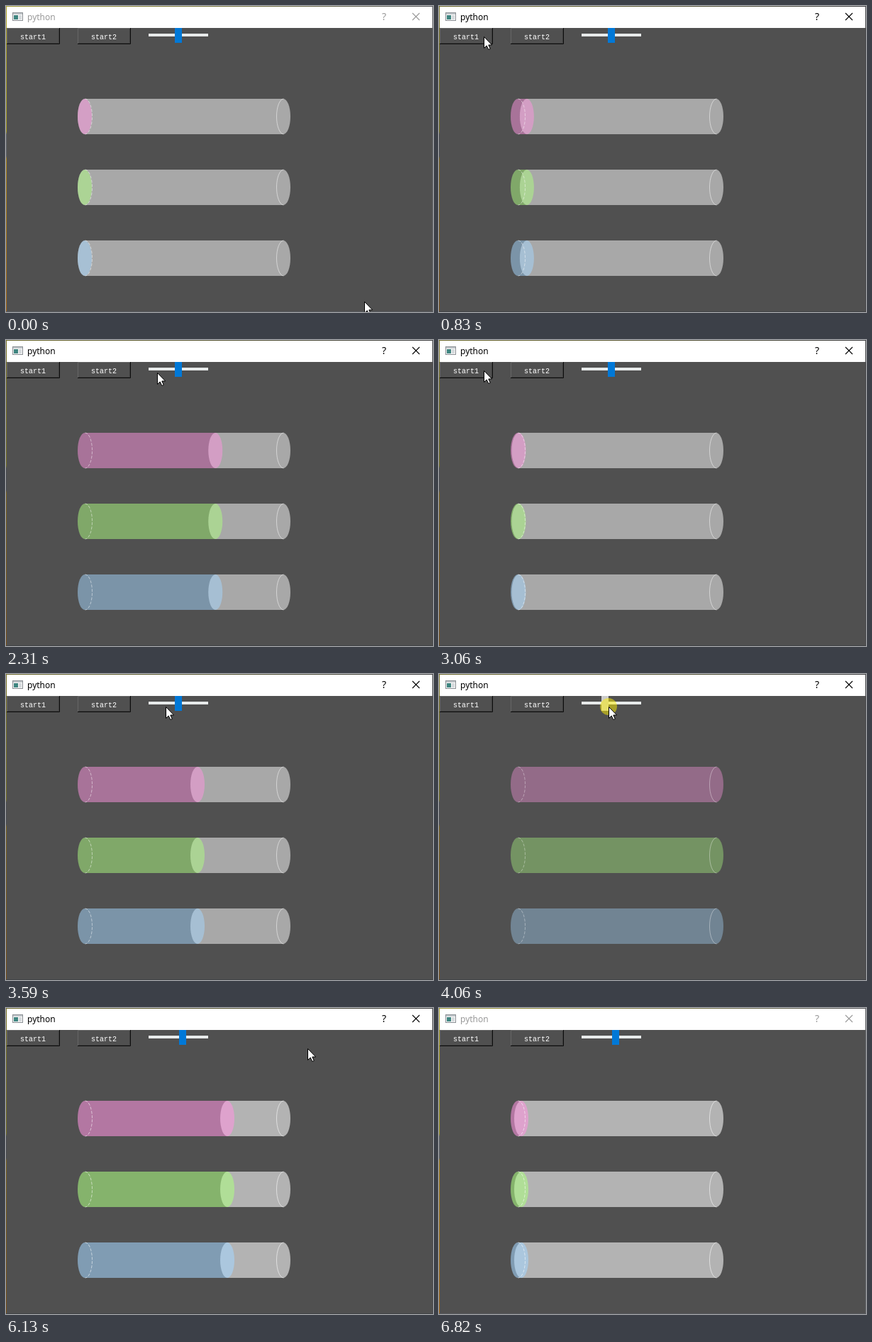
Recreate the animation shown at these times as an HTML page. Size 602 by 432 pixels, loop 6.9 s.

```html
<!DOCTYPE html>
<html lang="en">
<head>
<meta charset="utf-8">
<title>python</title>
<style>
  html, body { margin: 0; width: 100%; height: 100%; overflow: hidden; background: #505050; }
  svg { display: block; width: 602px; height: 432px; }
  .ui { font: 12px "Noto Sans", "Open Sans", sans-serif; fill: #000; }
  .label { font: 10px "Liberation Mono", monospace; fill: #fff; }
  .line { fill: none; stroke: #fff; stroke-width: 1; }
  .glyph { fill: none; stroke: #000; stroke-width: 1.1; }
  .inactive .ui { fill: #999; }
  .inactive .glyph { stroke: #999; }
  .frame { opacity: .62; }
  .inactive .frame { opacity: 1; }
  .light { fill: none; stroke: #666; }
  .dark { fill: none; stroke: #0c0c0c; }
  .shade { fill: none; stroke: #3e3e3e; }
  .pressed .light { stroke: #0c0c0c; }
  .pressed .dark { stroke: #666; }
  .pressed .label { transform: translate(1px, 1px); }
</style>
</head>
<body>
<svg id="stage" viewBox="0 0 602 432">
  <defs>
    <linearGradient id="edge" x1="0" y1="0" x2="0" y2="1">
      <stop offset="0" stop-color="#b0a52c"/>
      <stop offset=".41" stop-color="#a8a028"/>
      <stop offset=".42" stop-color="#62666e"/>
      <stop offset=".49" stop-color="#62666e"/>
      <stop offset=".5" stop-color="#b08a20"/>
      <stop offset="1" stop-color="#a86a18"/>
    </linearGradient>
    <linearGradient id="top">
      <stop offset="0" stop-color="#a09a38"/>
      <stop offset=".5" stop-color="#77743c"/>
      <stop offset="1" stop-color="#55565a"/>
    </linearGradient>
  </defs>

  <rect width="602" height="432" fill="#222"/>
  <g class="frame">
    <rect width="602" height="1" fill="url(#top)"/>
    <rect width="1" height="432" fill="url(#edge)"/>
    <rect x="601" width="1" height="432" fill="#606266"/>
    <rect y="431" width="602" height="1" fill="#55585c"/>
  </g>
  <rect x="1" y="1" width="600" height="30" fill="#fff"/>
  <rect x="1" y="31" width="600" height="400" fill="#505050"/>

  <rect x="9.5" y="9.5" width="14" height="11" fill="#f6f6f6" stroke="#8a8f94"/>
  <rect x="10" y="10" width="13" height="2" fill="#c3c8cc"/>
  <rect x="11" y="13" width="6" height="6" fill="#3f8580"/>
  <rect x="18" y="13" width="4" height="6" fill="#d6dadd"/>
  <text class="ui" x="30" y="20">python</text>
  <text class="ui" x="533" y="20" text-anchor="middle" style="font-size:14px">?</text>
  <path class="glyph" d="M573 10l10 10M583 10l-10 10"/>

  <g id="buttons"></g>
  <rect x="201" y="39" width="84" height="4" fill="#e7eaea"/>
  <rect id="handle" y="31" width="10" height="21"/>
  <g id="tubes"></g>
  <circle id="halo" r="12" fill="#fff000" fill-opacity=".5"/>
  <path id="cursor" d="M.5 .5V16.5L4.2 13L6.8 18.5L9.3 17.4L6.8 12H11.6Z"
        fill="#fff" stroke="#000" stroke-width="1"/>
</svg>
<script>
const LOOP = 6900, STEP = 76.6, LAST = 89;
const LEFT = 111, RIGHT = 391, RX = 10, RY = 25;
const COLORS = ['#ff96e2', '#afff82', '#a5d7ff'];

// Each key: [step, value, ...]
const FRONT = [
  [0, LEFT], [10.4, LEFT], [23.45, RIGHT], [25.53, RIGHT], [38.6, LEFT],
  [39.93, LEFT], [40, 112.5], [49, 315], [52.4, RIGHT],
  [76.37, RIGHT], [80, 312], [89, 116]
];
const VALUE = [[0, 50], [50, 50], [53, 38], [62, 38], [66, 57]];
const POINTER = [
  [0, 505, 417], [3, 420, 290], [6, 180, 100], [8, 70, 45], [9, 63, 43],
  [11, 63, 43], [17, 157, 43], [26, 157, 43], [30, 213, 46], [32, 213, 46],
  [37, 63, 43], [40, 63, 43], [48, 248, 46], [50, 248, 46], [53, 239, 46],
  [62, 239, 46], [66, 254, 46], [68, 254, 46], [69, 258, 46], [70, 254, 46],
  [71, 254, 46], [74, 157, 46], [77, 157, 46], [80, 425, 57],
  [82, 555, 200], [84, 595, 386]
];
const PRESSES = [[10, 10, 0], [25, 25, 1], [39, 39, 0], [50, 68, 2], [76, 76, 1]];
const ACTIVE = [10, 85], POINTER_GONE = 85;

const $ = id => document.getElementById(id);

function add(parent, tag, attrs) {
  const el = document.createElementNS('http://www.w3.org/2000/svg', tag);
  for (const key in attrs) el.setAttribute(key, attrs[key]);
  return parent.appendChild(el);
}

function set(el, attrs) {
  for (const key in attrs) el.setAttribute(key, attrs[key]);
}

function track(keys, k) {
  const i = keys.findIndex(key => key[0] > k);
  if (i < 0) return keys[keys.length - 1].slice(1);
  const a = keys[i - 1], b = keys[i], p = (k - a[0]) / (b[0] - a[0]);
  return a.slice(1).map((v, n) => v + (b[n + 1] - v) * p);
}

// Cylinder seen from the side, with rounded ends centred on x1 and x2
function cylinder(x1, x2, y) {
  const arc = `A${RX} ${RY} 0 0 1`;
  return `M${x1} ${y + 50}${arc} ${x1} ${y}H${x2}${arc} ${x2} ${y + 50}Z`;
}

function makeButton(x, text) {
  const g = add($('buttons'), 'g', { transform: `translate(${x} 31)` });
  add(g, 'path', { class: 'light', d: 'M.5 22V.5H74' });
  add(g, 'path', { class: 'shade', d: 'M1 21.5H73.5V1' });
  add(g, 'path', { class: 'dark', d: 'M0 22.5H74.5V0' });
  add(g, 'text', { class: 'label', x: 19, y: 16 }).textContent = text;
  return g;
}

function makeTube(color, i) {
  const y = 131 + i * 100, g = add($('tubes'), 'g', {});
  const tube = {
    y,
    empty: add(g, 'path', { fill: '#fff' }),
    fluid: add(g, 'path', { fill: color }),
    lines: add(g, 'g', { class: 'line' })
  };
  const half = (x, sweep) => `M${x + .5} ${y}A${RX} ${RY} 0 0 ${sweep} ${x + .5} ${y + 50}`;
  add(tube.lines, 'path', { d: half(LEFT, 1), 'stroke-dasharray': '4 2' });
  add(tube.lines, 'path', { d: half(RIGHT, 0) });
  return tube;
}

const buttons = [makeButton(1, 'start1'), makeButton(101, 'start2')];
const tubes = COLORS.map(makeTube);

function draw(k) {
  const [front] = track(FRONT, k), [value] = track(VALUE, k), [x, y] = track(POINTER, k);
  const press = PRESSES.find(([from, to]) => k >= from && k <= to);
  const target = press ? press[2] : -1, alpha = value / 100;

  $('stage').classList.toggle('inactive', k < ACTIVE[0] || k > ACTIVE[1]);
  buttons.forEach((b, i) => b.classList.toggle('pressed', i === target));
  set($('handle'), {
    x: Math.floor(201.85 + .74 * value),
    fill: target === 2 ? '#ccc' : '#0078d7'
  });

  for (const t of tubes) {
    set(t.empty, {
      d: cylinder(front, RIGHT, t.y),
      'fill-opacity': front < RIGHT ? alpha : 0
    });
    set(t.fluid, { d: cylinder(LEFT, front, t.y), 'fill-opacity': alpha });
    set(t.lines, { 'stroke-opacity': alpha });
  }

  set($('halo'), { cx: x, cy: y, visibility: press ? 'visible' : 'hidden' });
  set($('cursor'), {
    transform: `translate(${Math.round(x)} ${Math.round(y)})`,
    visibility: k < POINTER_GONE ? 'visible' : 'hidden'
  });
}

const start = performance.now();
function tick() {
  const t = (performance.now() - start) % LOOP;
  draw(Math.min(LAST, Math.floor((t + 16) / STEP)));
  requestAnimationFrame(tick);
}
tick();
</script>
</body>
</html>
```
